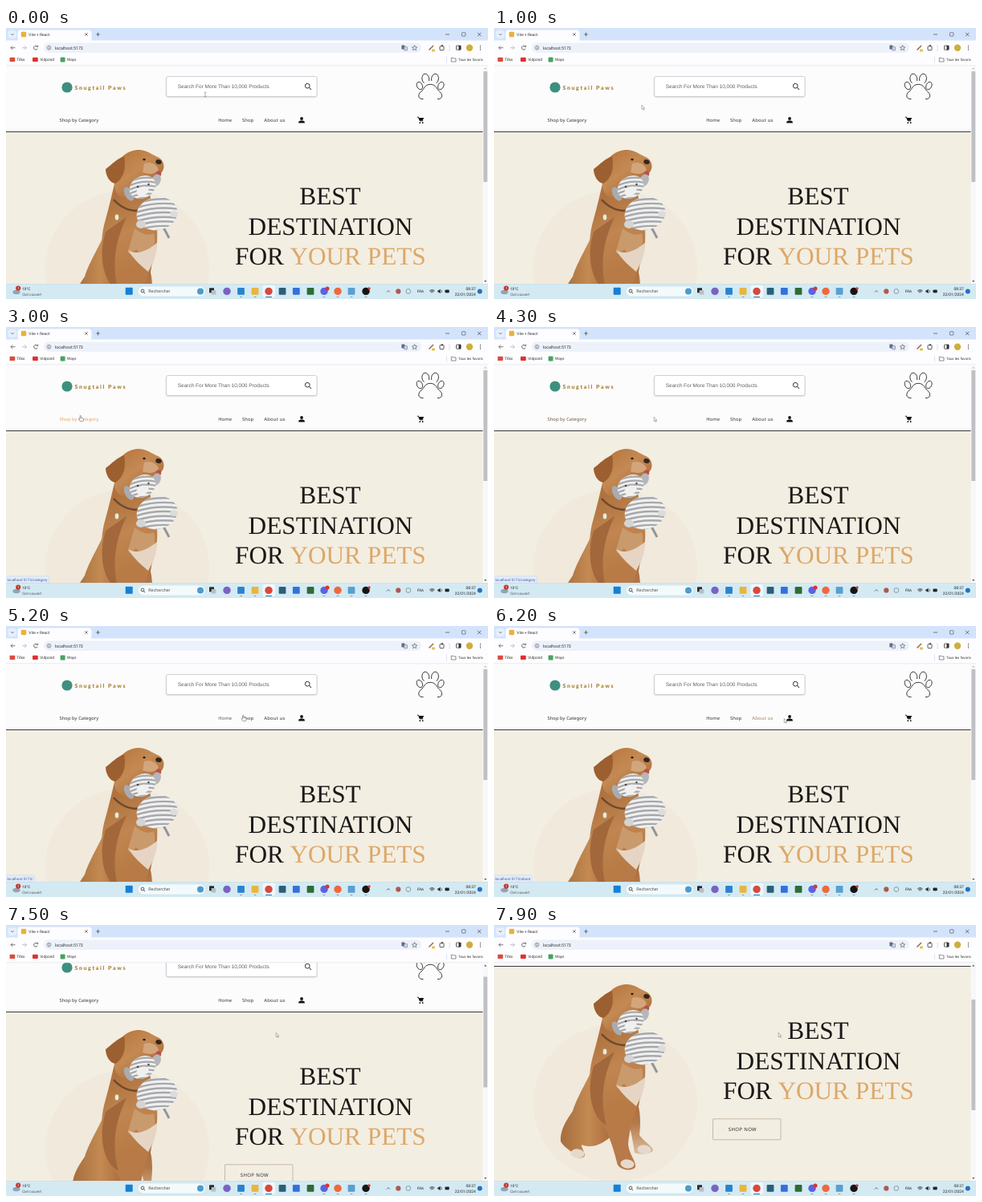
Animation, 600 px wide and 338 px high, one loop 8 s. Source, as an HTML page with a canvas:

```html
<!DOCTYPE html>
<html lang="fr">
<head>
<meta charset="utf-8">
<title>Pet shop</title>
<style>
html, body { margin: 0; width: 100%; height: 100%; overflow: hidden; background: #fdfcfd; }
#stage { position: absolute; left: 0; top: 0; width: 600px; height: 338px; overflow: hidden; }
#view { position: absolute; left: 0; top: 47px; width: 600px; height: 272px; overflow: hidden; }
#page { position: absolute; left: 0; top: -47px; width: 600px; height: 480px; }
canvas, svg { position: absolute; left: 0; top: 0; }
text { text-rendering: geometricPrecision; white-space: pre; }
</style>
</head>
<body>
<div id="stage">
  <div id="view"><div id="page"></div></div>
  <div id="frame"></div>
  <div id="top"></div>
</div>
<script>
const $ = id => document.getElementById(id);
const UI = 'Roboto, sans-serif', NAV = '"Noto Sans", sans-serif';
const ARIAL = '"Liberation Sans", Arial, sans-serif';
const TIMES = '"Liberation Serif", "Times New Roman", serif';
const NS = 'http://www.w3.org/2000/svg';
const LOOP = 8000, GOLD = [217, 165, 98], INK = [48, 48, 50];

function layer(id, h) {
  const box = $(id), dpr = window.devicePixelRatio || 1;
  const cv = document.createElement('canvas');
  cv.width = 600 * dpr;
  cv.height = h * dpr;
  cv.style.cssText = `width:600px;height:${h}px`;
  const svg = document.createElementNS(NS, 'svg');
  svg.setAttribute('width', 600);
  svg.setAttribute('height', h);
  box.append(cv, svg);
  const g = cv.getContext('2d');
  g.scale(dpr, dpr);
  return { g, svg };
}

function label(svg, x, y, size, str, fill, font = UI, extra = '') {
  const t = document.createElementNS(NS, 'text');
  t.setAttribute('x', x);
  t.setAttribute('y', y);
  t.style.cssText = `font-family:${font};font-size:${size}px;fill:${fill};${extra}`;
  t.textContent = str;
  svg.append(t);
  return t;
}

let g;
function rect(x, y, w, h, fill, r = 0, stroke, lw = 0.6) {
  g.beginPath();
  g.roundRect(x, y, w, h, r);
  paint(fill, stroke, lw);
}
function oval(x, y, rx, ry, fill, rot = 0, stroke, lw = 0.6) {
  g.beginPath();
  g.ellipse(x, y, rx, ry, rot, 0, 7);
  paint(fill, stroke, lw);
}
const dot = (x, y, r, fill, stroke, lw) => oval(x, y, r, r, fill, 0, stroke, lw);
function shape(d, fill, stroke, lw = 0.7) {
  const p = new Path2D(d);
  if (fill) { g.fillStyle = fill; g.fill(p); }
  if (stroke) { g.strokeStyle = stroke; g.lineWidth = lw; g.stroke(p); }
}
function paint(fill, stroke, lw) {
  if (fill) { g.fillStyle = fill; g.fill(); }
  if (stroke) { g.strokeStyle = stroke; g.lineWidth = lw; g.stroke(); }
}
function fade(x0, y0, x1, y1, ...colors) {
  const f = g.createLinearGradient(x0, y0, x1, y1);
  colors.forEach((c, i) => f.addColorStop(i / (colors.length - 1), c));
  return f;
}

// ---- web page ----
const page = layer('page', 480);
g = page.g;
rect(0, 0, 600, 480, '#fdfcfd');
rect(0, 130, 594, 350, '#f3eee2');
rect(0, 129, 594, 1, '#3a3a3a');

dot(76, 74, 6.6, '#3d8f80');

g.save();
g.shadowColor = 'rgba(90,95,120,.35)';
g.shadowBlur = 2;
g.shadowOffsetY = 0.8;
rect(199.5, 60.5, 187.5, 25, '#fff', 2.5);
g.restore();
rect(199.5, 60.5, 187.5, 25, null, 2.5, '#bfc0c8', 0.7);
dot(375.2, 72.2, 2.9, null, '#222', 0.9);
shape('M377.3 74.3L380 77', null, '#222', 1);

function pawOutline() {
  const c = '#222', w = 0.9;
  oval(522.3, 63.3, 4.4, 6.2, null, -0.15, c, w);
  oval(534, 63.3, 4.4, 6.2, null, 0.15, c, w);
  oval(514.9, 72, 3.4, 5, null, -0.45, c, w);
  oval(541.4, 72, 3.4, 5, null, 0.45, c, w);
  rect(520.5, 66, 15, 8, '#fdfcfd');
  shape('M519.5 88.6C512 89 512.6 82 517 79C520.5 76.5 521 70.3 528.2 70.3' +
    'C535.4 70.3 536 76.5 539.4 79C543.8 82 544.4 89 537 88.6', null, c, w);
}
pawOutline();

dot(368, 113, 1.9, '#111');
shape('M364.2 118.6V117.4C364.2 115 371.8 115 371.8 117.4V118.6Z', '#111');
shape('M511.8 111.2H513.4L515.2 115.8H519.2', null, '#111', 0.9);
shape('M513.6 112H520.2L518.6 115.4H515Z', '#111');
dot(515.3, 118.2, 0.9, '#111');
dot(518.7, 118.2, 0.9, '#111');

function dog() {
  oval(151, 222, 102, 98, '#f0e9dc');
  // haunch and far leg
  shape('M130 160C120 190 104 212 98 232C88 246 82 258 83 270C88 278 94 280 97 284C97 292 113 292 113 287' +
    'C112 281 109 278 109 274C124 280 136 272 148 262L176 250L186 190Z',
    fade(86, 0, 150, 0, '#a8703f', '#c48a52', '#a4683a'));
  shape('M168 205C181 215 184 240 181 262C186 270 197 275 198 281C196 286 182 287 175 284C172 262 166 240 164 222Z',
    fade(0, 210, 0, 284, '#a4683a', '#b47a48', '#d9bb9c'));
  // torso and near leg
  shape('M136 112C131 134 127 150 122 168C114 200 124 244 138 252C146 270 150 284 153 296' +
    'C154 306 172 308 176 302C177 294 169 288 167 274C168 255 176 232 182 216C189 198 191 176 184 148L174 112Z',
    fade(122, 140, 178, 262, '#b0733f', '#c08550', '#b87b46', '#b87a48'));
  shape('M150 158C138 184 130 214 140 250C122 240 114 208 124 176Z', '#a2673a');
  shape('M160 172C168 178 176 182 184 178C187 190 184 202 180 212C172 208 166 202 162 198C156 204 152 206 152 200Z',
    '#c99a6c');
  shape('M152 199C162 206 176 200 188 190C189 202 183 215 177 226C170 220 158 210 152 199Z', '#e6d5c4');
  for (const [x, y] of [[104, 285], [166, 298], [187, 280]]) oval(x, y, 8.6, 5.6, '#e6d9cc', 0.1);
  // collar
  shape('M134 136C142 145 152 150 164 150', null, '#6d4a2d', 2.6);
  oval(138, 158, 2.8, 4, '#f0ead9', 0, '#a88450', 0.8);
  // head
  shape('M137 96C141 82 152 75 163 74C174 73 180 79 191 84C198 89 198 98 193 103' +
    'C186 112 176 112 170 122C158 138 138 138 135 120Z', fade(140, 80, 176, 126, '#b9783f', '#c48a54', '#ad6d3a'));
  shape('M147 82C138 85 132 92 124 98C124 106 129 115 136 116C146 110 150 98 147 82Z', '#9c5f30');
  shape('M172 91C180 88 188 92 190 99C184 106 176 104 170 102Z', '#d3a57a');
  oval(190, 89, 3.8, 2.8, '#33261f', 0.3);
  oval(172, 86, 1.7, 1.3, '#2c1d14');
  oval(190, 104, 3.2, 3.4, '#b9504a');
}

// a striped round part of the plush
function plush(x, y, rx, ry, rot, step) {
  g.save();
  oval(x, y, rx, ry, '#f0f0ee', rot);
  g.clip();
  for (let s = y - ry - 2; s < y + ry + 6; s += step) {
    shape(`M${x - rx} ${s + 4}Q${x} ${s - 4} ${x + rx} ${s}`, null, '#a6a8ad', step * 0.44);
  }
  g.restore();
}
function toy() {
  shape('M195 170C199 175 200 179 203 184', null, '#93959a', 3);
  plush(188, 153.5, 25.5, 20.5, -0.2, 5.6);
  oval(209, 154, 5, 4, '#dcdcdb');
  oval(168, 167, 6, 5, '#d4d4d4');
  oval(153, 129, 5, 9.5, '#a9abb0', -0.5);
  oval(187, 112, 5.5, 8, '#b5b6ba', 0.4);
  plush(170, 120.5, 17, 13.5, -0.5, 5);
  oval(170, 125.5, 8, 5.5, '#f0f0ee', -0.4);
  dot(164, 120, 1.3, '#444');
  dot(177.5, 117, 1.2, '#444');
}
g.save();
g.translate(0, 78);
dog();
toy();
g.restore();

g.setLineDash([1, 0.6]);
rect(272.5, 319.8, 84.5, 26, null, 1, '#8d7455', 0.7);
g.setLineDash([]);

const P = (...a) => label(page.svg, ...a);
P(85.5, 76.8, 6.9, 'Snugtail Paws', '#a8873a', 'Lato, sans-serif', 'font-weight:900;letter-spacing:1.65px');
P(213.8, 75.2, 6.47, 'Search For More Than 10,000 Products', '#606064', ARIAL);
const nav = (x, str, ls = 0.1) => P(x, 116.9, 5.8, str, '#303032', NAV, `font-weight:500;letter-spacing:${ls}px`);
const hero = (x, row, str, fill) => P(x, 220.4 + row * 37.5, 31.25, str, fill, TIMES);
hero(365.3, 0, 'BEST', '#1a1817');
hero(301.6, 1, 'DESTINATION', '#1a1817');
hero(285, 2, 'FOR ', '#1a1817');
hero(353.4, 2, 'YOUR PETS', '#dca869');
P(291.8, 334.5, 6, 'SHOP NOW', '#2b2b2b', NAV, 'font-weight:500;letter-spacing:.36px');

// text node, hover start, hover end, link path
const links = [
  [nav(66.5, 'Shop by Category', 0.05), 1700, 4100, 'category'],
  [nav(264.2, 'Home'), 4700, 5000, ''],
  [nav(294, 'Shop'), 5200, 5500, 'shop'],
  [nav(321.2, 'About us', 0.25), 5700, 6100, 'about'],
];

// ---- browser and desktop ----
const frame = layer('frame', 338);
g = frame.g;
const F = (...a) => label(frame.svg, ...a);
const line = (d, c = '#444', w = 0.7) => shape(d, null, c, w);

rect(0, 0, 600, 16, '#d3e3fb');
rect(2.5, 3, 10.5, 10, '#e6effc', 3);
line('M6.3 7.2L8 8.9L9.7 7.2');
rect(14.5, 2.5, 92, 14, '#fdfdff', 3.5);
rect(18.8, 4.8, 6.4, 6.4, '#e8b23c', 1);
line('M98.3 6.3L101.7 9.7M101.7 6.3L98.3 9.7');
line('M112 8H117M114.5 5.5V10.5');
line('M547 8H552');
rect(567.5, 5.7, 4.4, 4.4, null, 0.6, '#444');
line('M587 5.8L591.4 10.2M591.4 5.8L587 10.2');
F(28.3, 9.9, 4.9, 'Vite + React', '#333');

rect(0, 15.5, 600, 31.5, '#fdfdff');
line('M6 24.7H11.5M8.3 22.4L6 24.7L8.3 27');
line('M20 24.7H25.5M23.2 22.4L25.5 24.7L23.2 27', '#aaa');
g.beginPath();
g.arc(37, 24.7, 2.4, 0.4, 5.7);
paint(null, '#444', 0.8);
line('M37.8 23.4H39.7V21.5');
rect(47, 18.6, 470, 12.2, '#ecf1fa', 6);
dot(53.5, 24.7, 2.4, null, '#555', 0.6);
line('M53.5 24.2V26.3M53.5 22.9V23.6', '#555');
F(61, 26.5, 5.3, 'localhost:5173', '#333');
rect(492.4, 21.6, 4, 5, '#5e6b86', 0.6);
rect(495.5, 23.4, 4, 4.6, '#c9d2e4', 0.6, '#5e6b86', 0.5);
shape('M508.6 21.6L509.5 23.8L511.8 24L510 25.5L510.6 27.8L508.6 26.5L506.6 27.8L507.2 25.5L505.4 24L507.7 23.8Z', null, '#444', 0.6);
line('M526.5 27.5L532 22', '#8b6a52', 1.5);
rect(530, 26.5, 4, 3, '#e4c25d', 0.5);
rect(540, 22.7, 5, 5, null, 0.8, '#444', 0.9);
dot(543, 22.2, 1.1, '#444');
line('M552 21V29', '#c6d6f2');
rect(560.5, 22, 5.6, 5.2, null, 0.6, '#333', 0.8);
rect(563.5, 22, 2.6, 5.2, '#333');
dot(577, 24.7, 4.2, '#cfae3e');
for (const y of [22.4, 24.7, 27]) dot(590.5, y, 0.65, '#444');

rect(4.6, 36.7, 6.6, 5.4, '#dd4a3e', 0.5);
rect(33, 36.7, 6.8, 5.4, '#e0302c', 1);
rect(67.6, 36.4, 6, 6, '#48a25f', 1);
F(13.2, 41.3, 4.8, 'Tilko', '#333');
F(42.3, 41.3, 4.8, 'Vidpond', '#333');
F(76, 41.3, 4.8, 'Ways', '#333');
line('M548.5 35.5V43.5', '#cbd8ee');
shape('M554.3 37.2H556.4L557.2 38H560V42H554.3Z', null, '#444', 0.6);
F(563, 41.2, 4.4, 'Tous les favoris', '#333');
rect(0, 46.6, 600, 0.6, '#dfe3ea');

// taskbar
rect(0, 319, 600, 19, '#d4eaf3');
rect(0, 319, 600, 0.6, '#c3dbe6');
oval(13, 329.5, 4.6, 2.8, '#8fa5b8');
dot(15.2, 324.6, 3.1, '#c8372f');
F(14.2, 326.2, 4.2, '1', '#fff');
F(20.2, 327, 4.7, '10°C', '#222');
F(20.2, 333.6, 4.6, 'Ciel couvert', '#555');
rect(148.7, 323.7, 9, 9, '#1680d4', 0.8);
rect(164.2, 322, 84, 13, '#f3fafc', 6.5, '#c3d9e2', 0.5);
dot(170, 327.9, 1.9, null, '#333', 0.8);
line('M171.4 329.4L173 331', '#333', 0.9);
F(177.3, 330.3, 5.4, 'Rechercher', '#555');
dot(242, 328.4, 4, '#4a9ccf');
rect(253, 324.3, 6, 6, '#2a2a2c', 0.5);
rect(255.6, 327, 5.6, 5.6, '#b9bdc2', 0.5);
rect(319.5, 321, 15.5, 15, '#eef7fb', 2);
const icons = [
  [275, '#7a62c2', 1], [292.5, '#2a83cf', 0], [310, '#e9b53c', 0], [327, '#d9483b', 1],
  [344, '#2a5f78', 0], [361.3, '#3470dd', 0], [379, '#2f6b36', 0], [396, '#5a63e6', 1],
  [413, '#f0683a', 1], [430, '#5a9fd0', 0], [448, '#151515', 1],
];
for (const [x, c, round] of icons) round ? dot(x, 328.4, 4.7, c) : rect(x - 4.4, 324, 8.8, 8.8, c, 1);
dot(400, 325, 2.5, '#d2382f');
dot(452, 325, 1.7, '#d2382f');
for (const x of [292.5, 310, 396, 413, 430, 448]) rect(x - 1.5, 335, 3, 0.9, '#8a98a2', 0.4);
rect(323, 335, 8, 1, '#1b6fc0', 0.5);
line('M474 329.5L476 327.5L478 329.5', '#333');
dot(488.3, 328.4, 3.1, '#b0584e');
dot(500.8, 328.4, 2.9, null, '#7f9a9f', 1);
F(511.7, 330.2, 4.6, 'FRA', '#222');
for (const r of [1.5, 3, 4.4]) {
  g.beginPath();
  g.arc(530.4, 331, r, -2.4, -0.75);
  paint(null, '#222', 0.8);
}
shape('M537.4 327.2H538.7L540.6 325.5V331.3L538.7 329.6H537.4Z', '#222');
line('M541.8 326.8Q543 328.4 541.8 330', '#222');
rect(546.5, 326.4, 5.2, 3.8, '#222', 0.8);
const right = 'text-anchor:end';
F(584.8, 326.8, 4.9, '08:37', '#222', UI, right);
F(584.8, 333.6, 4.9, '22/01/2024', '#222', UI, right);
dot(589.8, 328.4, 3, '#2572c0');

// ---- moving overlay ----
const over = layer('top', 338);
const status = label(over.svg, 1.5, 316.8, 4.6, '', '#3d5c9c');

function along(keys, t) {
  let i = 1;
  while (i < keys.length - 1 && keys[i][0] < t) i++;
  const a = keys[i - 1], b = keys[i];
  const k = Math.min(1, Math.max(0, (t - a[0]) / (b[0] - a[0])));
  return a.slice(1).map((v, n) => v + (b[n + 1] - v) * k);
}
const route = [
  [0, 248, 83], [400, 246, 84], [900, 196, 96], [1400, 140, 110], [1700, 100, 114], [1900, 93.5, 114],
  [4000, 93.5, 114], [4150, 122, 114], [4300, 200, 115], [4700, 264, 115], [5000, 280, 115],
  [5200, 296, 115], [5500, 309, 115], [5700, 323, 115], [6000, 346, 116], [6200, 362, 118],
  [6600, 364, 120], [7000, 348, 131], [7300, 337, 136], [7500, 337, 137], [7900, 355, 137],
];
const scrollKeys = [[7400, 0], [7500, 21], [7600, 38], [7700, 52], [7800, 67], [7900, 78]];

function cursor(kind, x, y) {
  const edge = '#666';
  g.save();
  g.translate(x, y);
  if (kind === 'beam') {
    line('M-1.3 -2.8H1.3M0 -2.8V2.8M-1.3 2.8H1.3', '#777', 0.6);
  } else if (kind === 'hand') {
    shape('M-1.4 -3.2C-1.4 -4 -.2 -4 -.2 -3.2V-.8L2.6 -.2C3.2 0 3.2 1.5 2.4 3.6H-1.2L-3 .8C-3 0 -2 0 -1.4 .8Z', '#fff', edge, 0.6);
  } else {
    shape('M-.8 -2.6V2.6L.4 1.6L1.3 3.4L2.2 3L1.3 1.3H2.8Z', '#fff', edge, 0.5);
  }
  g.restore();
}

function draw(now) {
  const t = Math.floor(now % LOOP / 100) * 100;
  const [scroll] = along(scrollKeys, t);
  $('page').style.transform = `translateY(${-scroll}px)`;

  g = over.g;
  g.clearRect(0, 0, 600, 338);
  rect(593.5, 47, 6.5, 272, '#f8f8fa');
  rect(594.4, 54 + scroll / 2, 4.8, 138, '#bfc0c3', 0.5);
  shape('M595.2 51.6L596.8 49.6L598.4 51.6Z', scroll ? '#555' : '#bbb');
  shape('M595.2 315L596.8 317L598.4 315Z', '#555');

  let kind = t < 500 ? 'beam' : 'arrow', url = '';
  for (const [node, from, to, path] of links) {
    const rise = Math.min(1, Math.max(0, (t - from) / 300));
    const fall = Math.min(1, Math.max(0, (t - to) / 300));
    const k = rise * (1 - fall);
    node.style.fill = `rgb(${INK.map((v, i) => Math.round(v + (GOLD[i] - v) * k))})`;
    if (t >= from && t < to) kind = 'hand';
    if (t >= from + (from < 2000 ? 400 : 100) && t < to + 300) url = 'localhost:5173/' + path;
  }
  if (status.textContent !== url) status.textContent = url;
  if (url) {
    const w = status.getComputedTextLength() + 3.5;
    rect(-2, 310.8, w + 2, 8.6, '#e3edfb', 1.5, '#c3cfe0', 0.5);
  }
  cursor(kind, ...along(route, t));
}

const start = performance.now();
(function tick() {
  draw(performance.now() - start);
  requestAnimationFrame(tick);
})();
</script>
</body>
</html>
```
